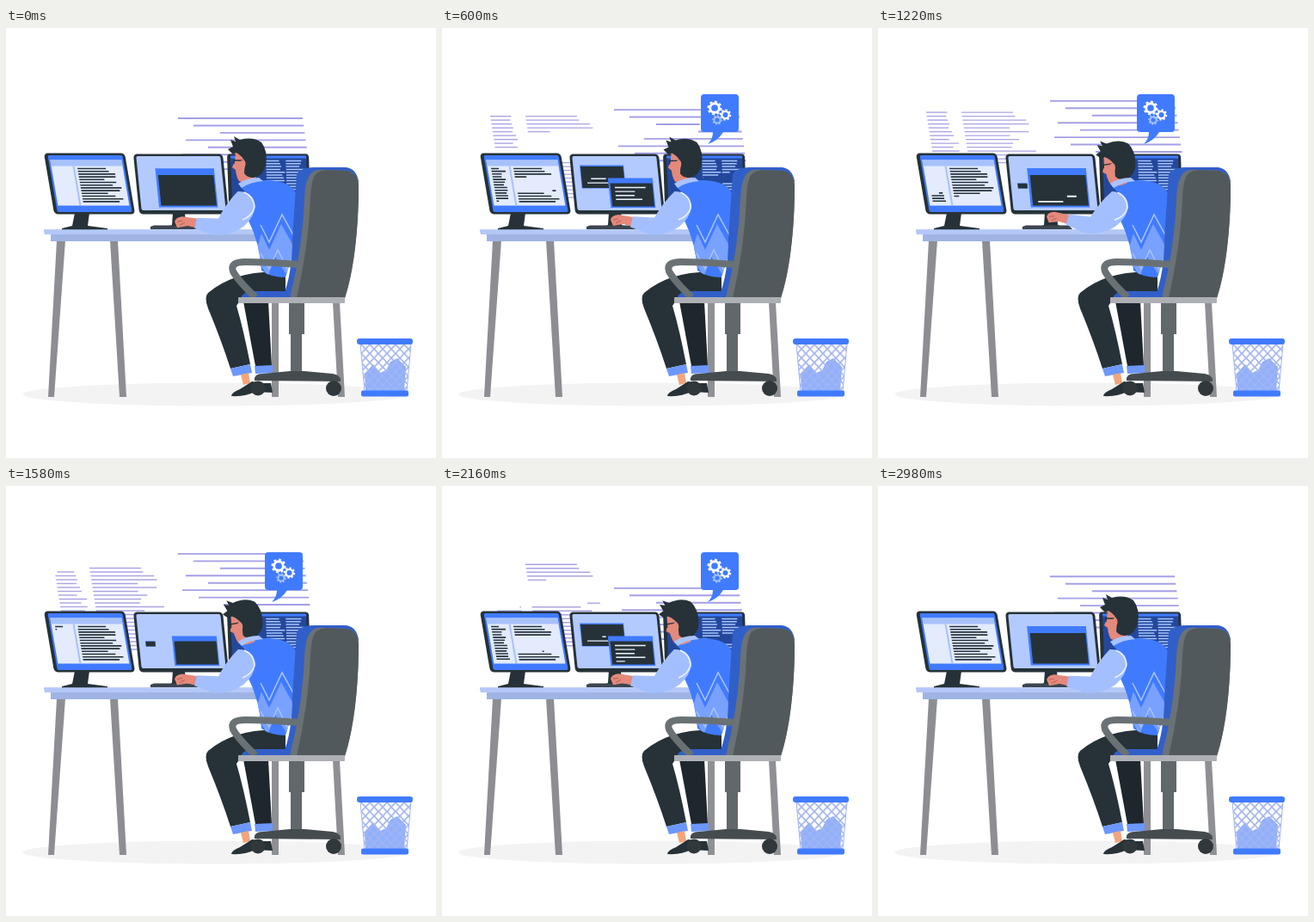
An HTML page for the animation above (3000 ms loop, 500x500 px).

```html
<!DOCTYPE html>
<html lang="en">
<head>
<meta charset="utf-8">
<title>Developer at work</title>
<style>
  html, body { margin: 0; width: 100%; height: 100%; overflow: hidden; background: #fff; }
  svg { display: block; width: 100vw; height: 100vh; }
</style>
</head>
<body>
<svg viewBox="0 0 500 500">
  <defs>
    <pattern id="mesh" width="10" height="10.500" patternUnits="userSpaceOnUse" x="413" y="368">
      <path d="M0 0L10 10.500M10 0L0 10.500" stroke="#a3b4ee" stroke-width="1.700"/>
    </pattern>
    <clipPath id="vestClip"><use href="#vest"/></clipPath>
  </defs>

  <ellipse cx="243.500" cy="426" rx="224" ry="13.500" fill="#f3f3f3"/>
  <g id="codeRight" stroke="#a49fe6" stroke-width="1.900"/>
  <g id="codeLeft" stroke="#aaa4e2" stroke-width="1.400"/>

  <g id="rightMonitor" transform="translate(257 146.500) skewX(2)">
    <rect width="95" height="69" rx="4" fill="#263238"/>
    <rect x="4" y="3" width="88" height="60" fill="#23489b"/>
    <rect x="4" y="2" width="88" height="3" fill="#407bff"/>
  </g>

  <g fill="#263238">
    <path d="M80 215H97L95 230L118 233V235H65V233L77 230Z"/>
    <path d="M194 215H208L209 229L220 233H184L193 229Z"/>
  </g>
  <g id="leftMonitor" transform="translate(44 145.500) skewX(9.700)">
    <rect width="94" height="71" rx="4.500" fill="#263238"/>
    <rect x="4" y="2.500" width="87" height="66" rx="2" fill="#407bff"/>
    <rect x="6" y="8" width="83" height="53" fill="#e3ebfd"/>
    <rect x="6" y="8" width="83" height="7" fill="#a7c1fb"/>
    <rect x="31" y="15" width="2" height="46" fill="#a7c1fb"/>
  </g>
  <g id="midMonitor" transform="translate(148 146.500) skewX(5.800)">
    <rect width="104" height="70" rx="4.500" fill="#263238"/>
    <rect x="3" y="2.500" width="98" height="63" rx="2" fill="#b3caff"/>
    <g id="backWindow">
      <rect width="51" height="27" fill="#407bff"/>
      <rect x=".7" y="1.500" width="49.600" height="25" fill="#263238"/>
    </g>
    <g id="frontWindow">
      <rect width="52" height="34.500" fill="#407bff"/>
      <rect x="2" y="6" width="49" height="27" fill="#263238"/>
    </g>
  </g>

  <path d="M59 247H69L56 429H49ZM121 247H130L140 429H132Z" fill="#8c8e93"/>
  <path d="M44 234.500H286L298 248H52V240H45Z" fill="#9fb4e4"/>
  <path d="M44 234.500H286L291 240H46Z" fill="#b4c8f8"/>
  <path d="M168 231L172 229.500H222L226 234H168Z" fill="#3c4650"/>

  <path d="M309 319H317V429H309ZM380 319H388L394 429H386Z" fill="#8e9094"/>
  <path d="M329 319H347V356H344V403H331V356H329Z" fill="#60686b"/>

  <path d="M276 318H305L309 393H290Z" fill="#1e272d"/>
  <path d="M325 284Q268 280 235 308Q230 313 235 326Q250 362 261 396L284 391Q276 350 268 323Q272 316 280 313H325Z" fill="#263238"/>
  <path d="M261 396L284 391L286 401L264 405ZM289 393L310 392V401L290 402Z" fill="#6c97ff"/>
  <path d="M273 403L282 401L284 413L276 415Z" fill="#f2a57c"/>
  <path id="shoe" d="M262 428Q262 424 272 420Q280 415 286 411L300 413H308L310 424L289 423Q279 429 262 428Z" fill="#263238"/>
  <path d="M289 410Q288 402 298 402L330 399H347L380 402Q390 404 389 411Z" fill="#454c4f"/>
  <g fill="#30383c"><circle cx="293" cy="419" r="8.500"/><circle cx="381" cy="419" r="9"/></g>

  <path d="M274 312Q277 306 290 306H336V314H274Z" fill="#315fc9"/>
  <path id="vest" d="M272 184Q288 176 306 177Q333 179 338 194L340 240L325 290Q308 290 297 282Q295 250 282 224Q294 205 272 184Z" fill="#407bff"/>
  <g clip-path="url(#vestClip)">
    <path d="M297 239L306 258L320 228L340 264L328 290L313 266L304 290L290 262Z" fill="#79a1ff"/>
    <path d="M296 229L306 249L321 217L342 255M296 262L306 280L316 258L332 290" fill="none" stroke="#a8c3ff" stroke-width="1.500"/>
  </g>

  <path d="M338 170Q343 162 358 162H395Q407 163 410 178L360 313H322Q333 285 333 245Z" fill="#315fc9"/>
  <path d="M356 168Q360 164 373 165L397 166Q410 169 410 185C410 235 404 285 394 314H330Q345 255 347 198Q348 174 356 168Z" fill="#6b7275"/>
  <path d="M361 169Q366 165 376 165L397 166Q410 169 410 185C410 235 404 285 394 314H338Q352 253 354 198Q355 174 361 169Z" fill="#52595c"/>
  <path d="M340 275Q305 272 278 272Q260 272 264 283Q270 294 290 313" fill="none" stroke="#697174" stroke-width="8"/>
  <rect x="270" y="313" width="124" height="7" rx="1" fill="#adb0b5"/>

  <g id="head">
    <path d="M267 145L279 143L291 171L289 179Q278 182 271 178Q268 174 267 165L263 162L266 155Z" fill="#e4897b"/>
    <path d="M264 147L258 141L264 138L261 130L267 132L265 126L272 130Q287 126 297 133Q305 143 302 160Q299 172 288 174Q280 174 277 169L278 156Q275 149 268 145Z" fill="#263238"/>
    <path d="M275 154H265V158" fill="none" stroke="#263238" stroke-width="1.300"/>
    <ellipse cx="275.500" cy="158" rx="3" ry="4.500" fill="#e4897b"/>
  </g>
  <path d="M270 181Q280 174 294 174L299 178Q284 179 274 186Z" fill="#a9c3ff"/>
  <g id="arm">
    <path d="M196 224Q197 219 205 218L224 221L223 232L211 229L199 231Z" fill="#e4897b"/>
    <path d="M205 223L199 224M208 225L202 228" stroke="#b96259" stroke-width="1"/>
    <path d="M270 190Q288 190 290 207Q289 220 276 231Q258 243 240 240L219 232L222 220L247 221Q256 204 270 190Z" fill="#a3bfff"/>
    <path d="M277 191Q289 196 289 209Q286 219 275 223" fill="none" stroke="#eef3ff" stroke-width="1.500"/>
  </g>

  <path d="M412 367H471L466 423H417Z" fill="#fff"/>
  <path d="M417 402L427 391L435 401L442 398L447 388L455 384L465 394L463 423H418Z" fill="#8eb0ff"/>
  <path d="M412 367H471L466 423H417Z" fill="url(#mesh)" stroke="#a3b4ee"/>
  <rect x="408" y="361" width="65" height="7" rx="3" fill="#407bff"/>
  <rect x="413" y="421.500" width="55" height="7" rx="2" fill="#407bff"/>

  <g id="bubble">
    <path d="M305 77H341Q345 77 345 81V117Q345 121 341 121H327Q321 131 309 135Q315 129 315 121H305Q301 121 301 117V81Q301 77 305 77Z" fill="#407bff"/>
  </g>
</svg>
<script>
const LOOP = 3000, HALF = LOOP / 2;
const $ = id => document.getElementById(id);
const clamp = v => Math.min(1, Math.max(0, v));
const ramp = (t, from, to) => clamp((t - from) / (to - from));
const smooth = u => u * u * (3 - 2 * u);
const transform = (id, value) => $(id).setAttribute('transform', value);

let seed = 7;
function random(min, max) {
  seed = seed * 16807 % 2147483647;
  return min + (max - min) * seed / 2147483647;
}

function add(parent, tag, attrs) {
  const node = document.createElementNS('http://www.w3.org/2000/svg', tag);
  for (const key in attrs) node.setAttribute(key, attrs[key]);
  return parent.appendChild(node);
}

// Lines of pretend text, each with a random width.
function textRows(id, { x, y = 0, step, count, min, max, slant = 0, ...style }) {
  const group = add($(id), 'g', style);
  return Array.from({ length: count }, (_, i) => {
    const top = y + step * i;
    return { node: add(group, 'line', { y1: top, y2: top }), x: x + slant * i, width: random(min, max) };
  });
}

// Shows the part of a row between two fractions of its width.
function span({ node, x, width }, from, to) {
  node.setAttribute('x1', x + width * from);
  node.setAttribute('x2', x + width * to);
  node.setAttribute('visibility', to > from ? 'visible' : 'hidden');
}

// Text is typed into an empty page, then erased from the top.
function typeAndErase(rows, typed, erased) {
  rows.forEach((row, i) => span(row, clamp(erased * rows.length - i), clamp(typed * rows.length - i)));
}

// Old text is erased from the top while new text follows it.
function retype(rows, typed, erased) {
  rows.forEach((row, i) => {
    const fresh = clamp(typed * rows.length - i);
    if (fresh) span(row, 0, fresh);
    else span(row, clamp(erased * rows.length - i), 1);
  });
}

function gear(x, y, r, color) {
  const g = add($('bubble'), 'g', { transform: `translate(${x} ${y})`, fill: 'none', stroke: color });
  add(g, 'circle', { r, 'stroke-width': r * 0.55 });
  add(g, 'circle', { r: r * 1.4, 'stroke-width': r * 0.4, pathLength: 16, 'stroke-dasharray': 1 });
}

gear(317, 93, 5.3, '#fff');
gear(329.5, 101, 4.2, '#fff');
gear(320, 107, 3.6, '#a8c3ff');

const ink = { stroke: '#263238', 'stroke-width': 1.6 };
const paper = { stroke: '#eef3ff', 'stroke-width': 1.4 };
const sky = { stroke: '#a9c5ff', 'stroke-width': 1.5 };

const indexRows = textRows('leftMonitor', { x: 10, y: 18, step: 3.15, count: 13, min: 9, max: 17, ...ink });
const pageRows = textRows('leftMonitor', { x: 36, y: 18, step: 3.2, count: 13, min: 28, max: 49, ...ink });
const backRows = textRows('backWindow', { x: 7, y: 11, step: 4.8, count: 3, min: 18, max: 25, ...paper });
const frontRows = textRows('frontWindow', { x: 7, y: 11, step: 4.6, count: 5, min: 14, max: 38, ...paper });
const columns = [45, 68].map(x =>
  textRows('rightMonitor', { x, y: 8, step: 3.3, count: 11, min: 14, max: 22, ...sky }));

const ROW = 4.5;
const asideRows = textRows('codeLeft', { x: 56, step: ROW, count: 22, min: 18, max: 34, slant: 0.7 });
const codeRows = textRows('codeLeft', { x: 97, step: ROW, count: 22, min: 50, max: 80, slant: 0.7 });
const wideRows = [200, 218, 249, 209, 235, 205, 224, 253].map((x, i) => {
  const y = 8.45 * i;
  return { node: add($('codeRight'), 'line', { y1: y, y2: y }), x, width: 345 + 1.2 * i - x };
});

function drawMonitors(t) {
  typeAndErase(indexRows, ramp(t, 30, 640), ramp(t, 700, 1400));
  retype(pageRows, ramp(t, 300, 1480), ramp(t, 80, 840));
  typeAndErase(backRows, ramp(t, 190, 360), ramp(t, 480, 780));
  typeAndErase(frontRows, ramp(t, 180, 720), ramp(t, 740, 1380));
  columns.forEach((rows, i) => {
    const time = t - 70 * i;
    retype(rows, ramp(time, 300, 850), ramp(time, 100, 700));
  });

  const open = ramp(t, 50, 190) - ramp(t, 1120, 1250);
  transform('backWindow', `translate(10.7 ${40 - 27 * open}) scale(${open})`);
  const grow = 1 - ramp(t, 0, 75) + ramp(t, 880, 990);
  transform('frontWindow', `translate(${42 - 18.5 * grow} ${28 - 11.5 * grow}) scale(${1 + 0.32 * grow})`);
}

function drawFloatingCode(t) {
  transform('codeLeft', `translate(0 ${107 - 0.0073 * t})`);
  $('codeLeft').style.display = t > 120 && t < 2780 ? '' : 'none';
  typeAndErase(asideRows, ramp(t, 80, 1380), ramp(t, 1520, 2700));
  if (t < HALF) retype(codeRows, ramp(t, 320, 1700), ramp(t, 120, 1000));
  else retype(codeRows, ramp(t, 1935, 3065), ramp(t, 1640, 2700));

  // The block on the right starts again lower down once it has been erased.
  const restart = 1800, age = t < restart ? t : t - LOOP;
  transform('codeRight', `translate(0 ${105 - 0.0165 * age})`);
  if (t < HALF) retype(wideRows, ramp(t, 340, 1170), ramp(t, 60, 1250));
  else if (t < restart) typeAndErase(wideRows, 1, ramp(t, 1590, restart));
  else typeAndErase(wideRows, ramp(t, restart, 2150), 0);
}

function drawPerson(t) {
  const nod = smooth(ramp(t, 400, 1580)) - smooth(ramp(t, 2160, 2900));
  transform('head', `translate(0 ${3 * nod}) rotate(${-10 * nod} 285 178)`);
  const lift = 1.75 - 2.75 * Math.cos(4 * Math.PI * t / HALF);
  transform('arm', `rotate(${lift} 272 222)`);
  transform('shoe', `translate(${-1.7 * Math.sin(Math.PI * ramp(t, 100, 560))} 0)`);
}

function draw(t) {
  drawMonitors(t % HALF);
  drawFloatingCode(t);
  drawPerson(t);
  const size = smooth(ramp(t, 100, 400)) - smooth(ramp(t, 2730, 2950));
  transform('bubble', `translate(300 135) scale(${size}) translate(-300 -135)`);
}

const start = performance.now();
function frame() {
  draw((performance.now() - start) % LOOP);
  requestAnimationFrame(frame);
}
frame();
</script>
</body>
</html>
```
